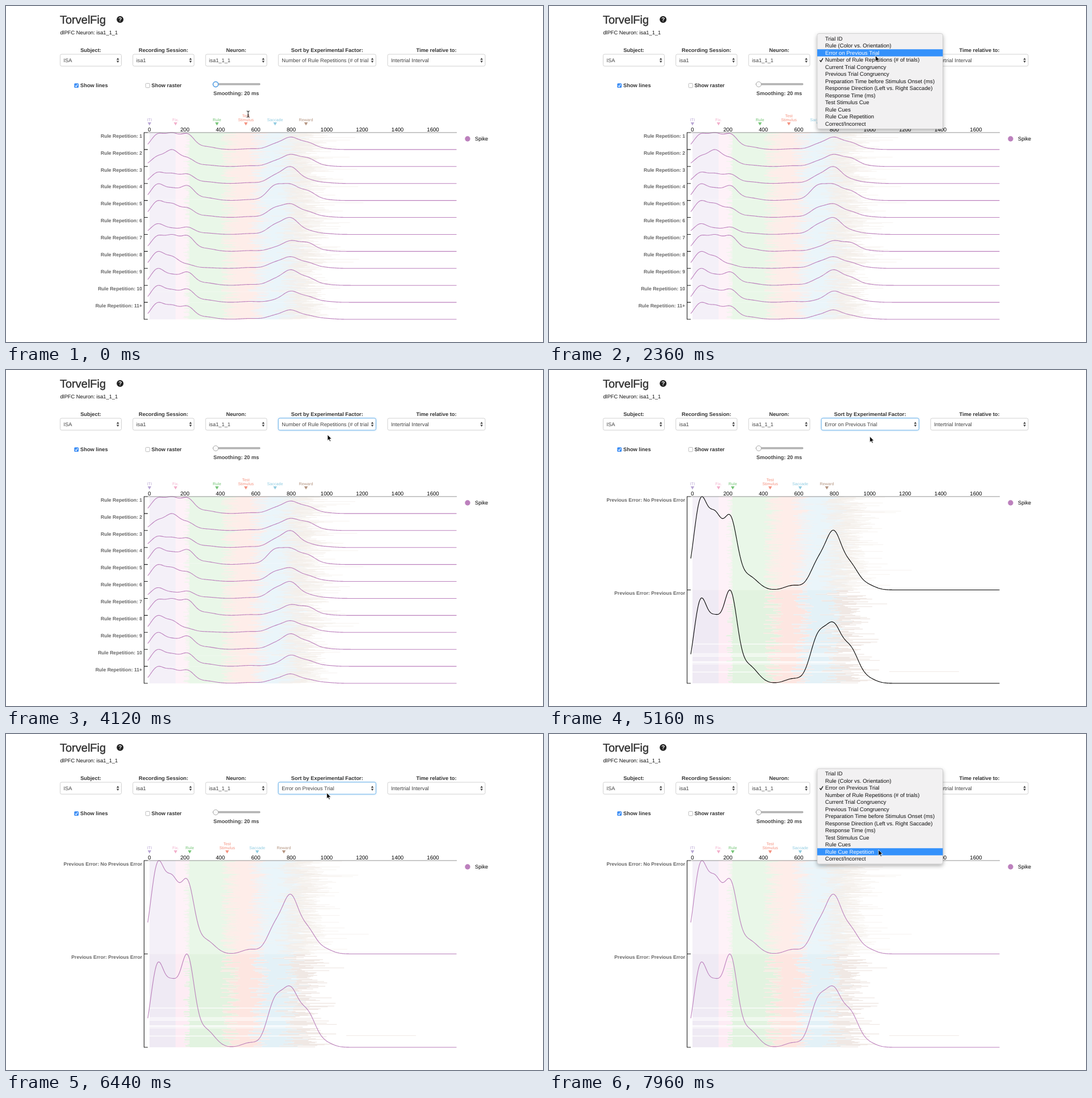
These frames come from a looping animation (947 by 592 pixels, 8 s). An HTML page:

```html
<!DOCTYPE html>
<html lang="en">
<head>
<meta charset="utf-8">
<title>Spike chart</title>
<style>
  html, body { margin: 0; width: 100%; height: 100%; overflow: hidden; background: #fff; }
  svg { display: block; width: 100vw; height: 100vh; }
  text { font-family: "Liberation Sans", Arial, sans-serif; font-size: 9.3px; text-rendering: geometricPrecision; }
  .bold { font-weight: bold; }
  .row { font-weight: bold; font-size: 8.6px; fill: #666; text-anchor: end; }
  .mid { text-anchor: middle; }
  .event { font-size: 7.2px; text-anchor: middle; }
  .menu text { font-size: 9.65px; }
  .curve { fill: none; stroke-width: 1.1; stroke-linejoin: round; }
</style>
</head>
<body>
<svg id="stage" viewBox="0 0 947 592">
  <defs>
    <filter id="shadow" x="-10%" y="-10%" width="120%" height="125%">
      <feDropShadow dx="0" dy="3" stdDeviation="3.5" flood-opacity=".32"/>
    </filter>
    <filter id="glow" x="-20%" y="-60%" width="140%" height="220%">
      <feDropShadow dx="0" dy="0" stdDeviation="1.4" flood-color="#66afe9" flood-opacity=".55"/>
    </filter>
  </defs>
</svg>
<script>
const LOOP = 8000, TOP = 223, HEIGHT = 329, LEFT = 253, PX_PER_MS = 0.3125;
const PURPLE = [188, 128, 189];
const stage = document.getElementById('stage');

function add(parent, name, attrs = {}, text = '') {
  const node = document.createElementNS('http://www.w3.org/2000/svg', name);
  for (const key in attrs) node.setAttribute(key, attrs[key]);
  node.textContent = text;
  parent.append(node);
  return node;
}
const label = (parent, x, y, text, attrs = {}) => add(parent, 'text', { x, y, ...attrs }, text);
const show = (node, visible) => node.setAttribute('visibility', visible ? 'visible' : 'hidden');
const ramp = (t, from, to) => Math.min(1, Math.max(0, (t - from) / (to - from)));

function seeded(seed) {
  return () => {
    seed = (seed * 1664525 + 1013904223) >>> 0;
    return seed / 4294967296;
  };
}

// ---- Page header and controls ----
label(stage, 95, 31, 'TorvelFig', { style: 'font-size:20px', fill: '#333', stroke: '#333', 'stroke-width': .45 });
add(stage, 'circle', { cx: 201.2, cy: 23.7, r: 6, fill: '#222' });
label(stage, 201.2, 27.3, '?', { class: 'bold mid', fill: '#fff', style: 'font-size:10px' });
label(stage, 95.4, 50, 'dlPFC Neuron: isa1_1_1', { fill: '#111' });

function select(x, width, title, value) {
  label(stage, x + width / 2, 81, title, { class: 'bold mid', fill: '#333' });
  const box = add(stage, 'rect', { x, y: 85, width, height: 21, rx: 2.6, fill: '#fff', stroke: '#ccc', 'stroke-width': .9 });
  const right = x + width - 6.3;
  add(stage, 'path', { d: `M${right - 2.3} 94.7h4.6l-2.3 -3.4zM${right - 2.3} 96.5h4.6l-2.3 3.4z`, fill: '#444' });
  return { box, text: label(stage, x + 6, 99, value, { fill: '#444' }) };
}
select(95.5, 108, 'Subject:', 'ISA');
select(223.7, 108, 'Recording Session:', 'isa1');
select(352, 108, 'Neuron:', 'isa1_1_1');
const factor = select(480.3, 172, 'Sort by Experimental Factor:', '');
select(673, 172, 'Time relative to:', 'Intertrial Interval');

add(stage, 'rect', { x: 120.3, y: 136.2, width: 7.8, height: 7.8, rx: 1.6, fill: '#3b8df5' });
add(stage, 'path', { d: 'M122 140.4l1.7 1.9 2.7-4.4', fill: 'none', stroke: '#fff', 'stroke-width': 1.1 });
label(stage, 131, 143, 'Show lines', { class: 'bold', fill: '#333' });
add(stage, 'rect', { x: 246.2, y: 136.4, width: 7.4, height: 7.4, rx: 1.4, fill: '#fff', stroke: '#aaa', 'stroke-width': .8 });
label(stage, 256.5, 143, 'Show raster', { class: 'bold', fill: '#333' });
add(stage, 'rect', { x: 365, y: 136.4, width: 83, height: 2.6, rx: 1, fill: '#bbb', stroke: '#888', 'stroke-width': .6 });
const knob = add(stage, 'circle', { cx: 369.8, cy: 138, r: 4.6, fill: '#fafafa' });
label(stage, 406, 157, 'Smoothing: 20 ms', { class: 'bold mid', fill: '#444' });

// ---- Charts ----
const EVENTS = [
  ['ITI', '#b9a6d4', '#efeaf4'], ['Fix.', '#f2b0cc', '#fdecf4'], ['Rule', '#74c476', '#e2f3e0'],
  ['Stimulus', '#f4917f', '#fde6e1'], ['Saccade', '#8fcbe0', '#e3f1f7'], ['Reward', '#b3937f', '#f0e8e4']
];

// One thin line per trial, split into coloured phases of random length.
function drawRaster(chart, seed, from, to, step, gapChance) {
  const random = seeded(seed), paths = EVENTS.map(() => '');
  for (let y = from + step / 2; y < to; y += step) {
    if (random() < gapChance && y > from + HEIGHT / 4) continue;
    const rule = 324 - 12 * random() ** 4;
    const test = 378 + 36 * random();
    const saccade = test + 45 + 18 * random();
    const reward = saccade + 38 + 30 * random();
    const end = reward + 15 + 14 * random() - 15 * Math.log(random() + .002);
    const edges = [LEFT, 299, rule, test, saccade, reward, end];
    paths.forEach((_, i) => paths[i] += `M${edges[i].toFixed(1)} ${y.toFixed(2)}H${edges[i + 1].toFixed(1)}`);
  }
  paths.forEach((d, i) => add(chart, 'path', { d, stroke: EVENTS[i][2], 'stroke-width': step + .08 }));
}

// Firing rate: bumps at shared moments of the trial, scaled so the peak fills the row.
const BUMPS = [267, 293, 320, 474, 502, 532];
const bell = (x, centre, width) => Math.exp(-((x - centre) ** 2) / (2 * width * width));

function curvePath(strengths, base, rowHeight) {
  const rate = x => strengths.reduce((sum, s, i) => sum + s * bell(x, BUMPS[i], i < 3 ? 12 : 14), 0)
    + .2 * strengths[2] * bell(x, 352, 16) + .5 * bell(x, 430, 14) + .5 * bell(x, 562, 14);
  const xs = Array.from({ length: 364 }, (_, i) => 250 + i * 1.5);
  const rates = xs.map(rate), scale = rowHeight / Math.max(...rates);
  return 'M' + xs.map((x, i) => `${x} ${(base - rates[i] * scale).toFixed(2)}`).join('L');
}

function makeChart(rowCount, markers) {
  const chart = add(stage, 'g'), backdrop = add(chart, 'g');
  const rowHeight = HEIGHT / rowCount, curves = add(chart, 'g', { class: 'curve' });
  let ticks = `M250 ${TOP}H243.5V${TOP + HEIGHT}H250`;
  for (let i = 1; i < rowCount; i++) ticks += `M243.5 ${TOP + i * rowHeight}h6.5`;
  add(chart, 'path', { d: ticks, fill: 'none', stroke: '#222', 'stroke-width': 1.1 });
  markers.forEach((x, i) => {
    const [name, fill] = EVENTS[i];
    label(chart, x, 203.3, name, { class: 'event', fill });
    if (name === 'Stimulus') label(chart, x, 196, 'Test', { class: 'event', fill });
    add(chart, 'path', { d: `M${x - 3.2} 205h6.4l-3.2 5.6z`, fill });
  });
  let index = 0;
  const addRow = (name, ...strengths) => {
    const top = TOP + rowHeight * index++;
    label(chart, 240, top + 8.7, name, { class: 'row' });
    add(curves, 'path', { d: curvePath(strengths, top + rowHeight, rowHeight) });
  };
  return { chart, backdrop, curves, addRow };
}

const repetition = makeChart(11, [253, 299, 372, 423, 474.5, 529]);
drawRaster(repetition.backdrop, 7, TOP, TOP + HEIGHT, .5, .01);
const addRepetition = (n, ...strengths) => repetition.addRow('Rule Repetition: ' + n, ...strengths);
addRepetition(1, 9, 9, 9, 3, 7, 4);
addRepetition(2, 6, 10, 5, 3, 7, 5);
addRepetition(3, 6, 5, 5, 4, 9, 2);
addRepetition(4, 9, 6, 8, 8, 8, 5);
addRepetition(5, 9, 7, 5, 5, 7, 3);
addRepetition(6, 6, 3, 4, 5, 9, 2);
addRepetition(7, 9, 9, 9, 2, 6, 5);
addRepetition(8, 9, 6, 2, 3, 6, 3);
addRepetition(9, 9, 5, 7, 3, 8, 4);
addRepetition(10, 9, 6, 7, 1, 6, 3);
addRepetition('11+', 9, 7, 7, 2, 5, 2);

const error = makeChart(2, [253, 299, 324, 390, 443, 490]);
drawRaster(error.backdrop, 21, TOP, TOP + HEIGHT / 2, .5, 0);
drawRaster(error.backdrop, 5, TOP + HEIGHT / 2, TOP + HEIGHT, 1.2, .08);
add(error.backdrop, 'path', { d: 'M600 531.3H723', stroke: EVENTS[5][2] });
error.addRow('Previous Error: No Previous Error', 9.5, 7.3, 7.5, 2.8, 6, 2.5);
error.addRow('Previous Error: Previous Error', 8.7, 6, 9.5, 4.8, 5.7, 3.5);

add(stage, 'path', { d: `M250 ${TOP}H795`, stroke: '#777', 'stroke-width': .8 });
for (let ms = 0; ms <= 1600; ms += 200) {
  label(stage, LEFT + ms * PX_PER_MS, 221, ms, { class: 'mid', style: 'font-size:9.6px' });
}
add(stage, 'circle', { cx: 814, cy: 234, r: 4.7, fill: `rgb(${PURPLE})` });
label(stage, 827, 237, 'Spike');

// ---- Drop-down menu ----
const ITEMS = ['Trial ID', 'Rule (Color vs. Orientation)', 'Error on Previous Trial',
  'Number of Rule Repetitions (# of trials)', 'Current Trial Congruency', 'Previous Trial Congruency',
  'Preparation Time before Stimulus Onset (ms)', 'Response Direction (Left vs. Right Saccade)',
  'Response Time (ms)', 'Test Stimulus Cue', 'Rule Cues', 'Rule Cue Repetition', 'Correct/Incorrect'];
const PITCH = 12.5, CHECKED_Y = 95;
const menu = add(stage, 'g', { class: 'menu' });
add(menu, 'rect', { x: 473, y: -9, width: 221.5, height: 168, rx: 3, fill: '#f2f1f2', stroke: '#bbb', 'stroke-width': .6, filter: 'url(#shadow)' });
const highlight = add(menu, 'rect', { x: 473, width: 221.5, height: PITCH, fill: '#3491fb' });
const items = ITEMS.map((name, i) => label(menu, 487, i * PITCH + 3.4, name));
const check = add(menu, 'path', { d: 'M477.5 .5l2 2.6 3.6-6', fill: 'none', 'stroke-width': 1.3 });

function drawMenu(checked, pointerY, opacity) {
  const top = CHECKED_Y - checked * PITCH;
  const hovered = Math.round((pointerY + 1 - top) / PITCH);
  menu.setAttribute('transform', `translate(0 ${top})`);
  menu.setAttribute('opacity', opacity);
  highlight.setAttribute('y', (hovered - .5) * PITCH);
  items.forEach((item, i) => item.setAttribute('fill', i === hovered ? '#fff' : '#111'));
  check.setAttribute('transform', `translate(0 ${checked * PITCH})`);
  check.setAttribute('stroke', checked === hovered ? '#fff' : '#111');
}

// ---- Pointer ----
const arrow = add(stage, 'path', { d: 'M0 0V10.4L2.4 8.2 4 11.9 5.7 11.2 4.1 7.6H7.3Z', stroke: '#fff', 'stroke-width': .8 });
const beam = add(stage, 'path', { d: 'M-2.5 -5.5Q0 -5.5 0 -4Q0 -5.5 2.5 -5.5M0 -4.5V4.5M-2.5 5.5Q0 5.5 0 4Q0 5.5 2.5 5.5M-1.2 1.5H1.2', fill: 'none', stroke: '#111', 'stroke-width': 1 });

// Each move eases to its end point and rests there until the next one.
const MOVES = [
  { from: 40, to: 840, x: 577, y: 94 },
  { from: 1700, to: 3100, x: 574, y: 79.5 },
  { from: 3600, to: 4120, x: 567, y: 114 },
  { from: 4240, to: 5700, x: 565.3, y: 118.5 },
  { from: 6050, to: 6800, x: 566, y: 90.5 },
  { from: 7450, to: 7900, x: 581, y: 204 }
];

function pointerAt(t) {
  let x = 427, y = 190.5;
  for (const move of MOVES) {
    const u = ramp(t, move.from, move.to), eased = u * u * (3 - 2 * u);
    x += (move.x - x) * eased;
    y += (move.y - y) * eased;
  }
  return [x, y];
}

const OPEN = 1040, CLOSE = 3560, CHANGE = 5160, REOPEN = 6960;

function render(t) {
  const [x, y] = pointerAt(t), onText = t < 100, changed = t >= CHANGE;
  arrow.setAttribute('transform', `translate(${x} ${y})`);
  beam.setAttribute('transform', `translate(${x} ${y})`);
  show(arrow, !onText);
  show(beam, onText);

  const sliderFocus = t < OPEN;
  knob.setAttribute('stroke', sliderFocus ? '#5aa2e6' : '#999');
  knob.setAttribute('stroke-width', sliderFocus ? 1.7 : .8);
  factor.box.setAttribute('stroke', sliderFocus ? '#ccc' : '#66afe9');
  factor.box.setAttribute('filter', sliderFocus ? 'none' : 'url(#glow)');
  factor.text.textContent = changed ? ITEMS[2] : 'Number of Rule Repetitions (# of trial';

  show(repetition.chart, !changed);
  show(error.chart, changed);
  const tint = ramp(t, 5900, 6450);
  error.curves.setAttribute('stroke', `rgb(${PURPLE.map(c => c * tint)})`);

  const opacity = t >= REOPEN ? 1 : t >= OPEN ? 1 - ramp(t, CLOSE, CLOSE + 180) : 0;
  drawMenu(changed ? 2 : 3, y, opacity);
}

repetition.curves.setAttribute('stroke', `rgb(${PURPLE})`);
const start = performance.now();
function frame() {
  render((performance.now() - start) % LOOP);
  requestAnimationFrame(frame);
}
frame();
</script>
</body>
</html>
```
